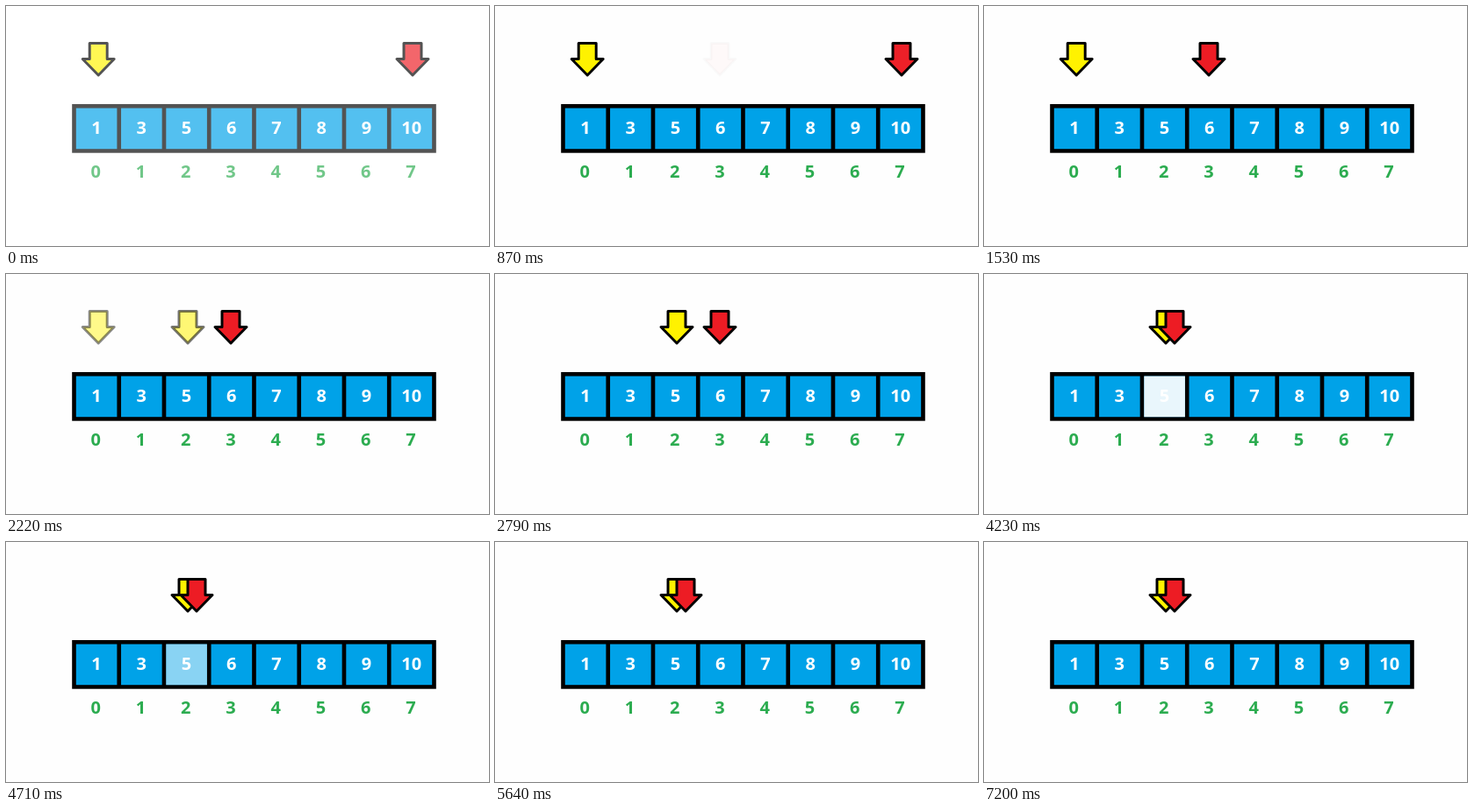
Recreate the animation shown at these times as an HTML page with a canvas. Size 550x274 px, loop 7.29 s.

```html
<!DOCTYPE html>
<html lang="en">
<head>
<meta charset="utf-8">
<title>Two pointers on a sorted array</title>
<style>
  html, body { margin: 0; height: 100%; overflow: hidden; background: #fefefe; }
  canvas { display: block; }
</style>
</head>
<body>
<canvas id="stage" width="550" height="274"></canvas>
<script>
const ctx = document.getElementById('stage').getContext('2d');
const LOOP = 7290;
const STEP = 1112;
const FIRST_STEP = 545;
const INTRO_START = -593;
const PAPER = '#fefefe', INK = '#000', BLUE = '#00a2e8', GREEN = '#2cac50';
const YELLOW = '#fff200', RED = '#ed1c24';
const values = [1, 3, 5, 6, 7, 8, 9, 10];
const PITCH = 51.25;
const CELL = 46.6;
const FOUND = 2;

function ease(x) {
  const p = Math.min(1, Math.max(0, x));
  return p < 0.5 ? 32 * p ** 6 : 1 - 32 * (1 - p) ** 6;
}

function withAlpha(alpha, draw) {
  if (alpha <= 0) return;
  ctx.save();
  ctx.globalAlpha = alpha;
  draw();
  ctx.restore();
}

function arrow(x, color, alpha) {
  withAlpha(alpha, () => {
    ctx.beginPath();
    ctx.moveTo(x - 10, 42.5);
    ctx.lineTo(x + 10, 42.5);
    ctx.lineTo(x + 10, 60.5);
    ctx.lineTo(x + 18, 60.5);
    ctx.lineTo(x, 79);
    ctx.lineTo(x - 18, 60.5);
    ctx.lineTo(x - 10, 60.5);
    ctx.closePath();
    ctx.fillStyle = color;
    ctx.fill();
    ctx.lineWidth = 3;
    ctx.lineJoin = 'round';
    ctx.strokeStyle = INK;
    ctx.stroke();
  });
}

function crossFade(from, to, color, p) {
  arrow(from, color, 1 - p);
  arrow(to, color, p);
}

function drawArray(whiteout) {
  ctx.fillStyle = INK;
  ctx.fillRect(75.2, 112, 414.6, 55.7);
  ctx.font = 'bold 20px "Open Sans", "Noto Sans", sans-serif';
  ctx.textAlign = 'center';
  values.forEach((value, i) => {
    const left = 79.8 + i * PITCH;
    ctx.fillStyle = BLUE;
    ctx.fillRect(left, 116.6, CELL, CELL);
    if (i === FOUND) {
      withAlpha(whiteout, () => {
        ctx.fillStyle = PAPER;
        ctx.fillRect(left, 116.6, CELL, CELL);
      });
    }
    ctx.fillStyle = '#fff';
    ctx.fillText(value, 103 + i * PITCH, 145.5);
    ctx.fillStyle = GREEN;
    ctx.fillText(i, 102.1 + i * PITCH, 196);
  });
}

function render(t) {
  const step = i => ease((t - FIRST_STEP) / STEP - i);
  const half = i => ease(((t - FIRST_STEP) / STEP - 3) * 2 - i);

  ctx.globalAlpha = 1;
  ctx.fillStyle = PAPER;
  ctx.fillRect(0, 0, 550, 274);

  drawArray(half(0) - half(1));
  crossFade(105.2, 207, YELLOW, step(1));
  if (t < FIRST_STEP + 2 * STEP) crossFade(463, 256, RED, step(0));
  else crossFade(256, 217, RED, step(2));

  const veil = 1 - ease((t - INTRO_START) / STEP);
  withAlpha(veil, () => {
    ctx.fillStyle = PAPER;
    ctx.fillRect(0, 0, 550, 274);
  });
}

const start = performance.now();
function tick() {
  render((performance.now() - start) % LOOP);
  requestAnimationFrame(tick);
}
tick();
</script>
</body>
</html>
```
